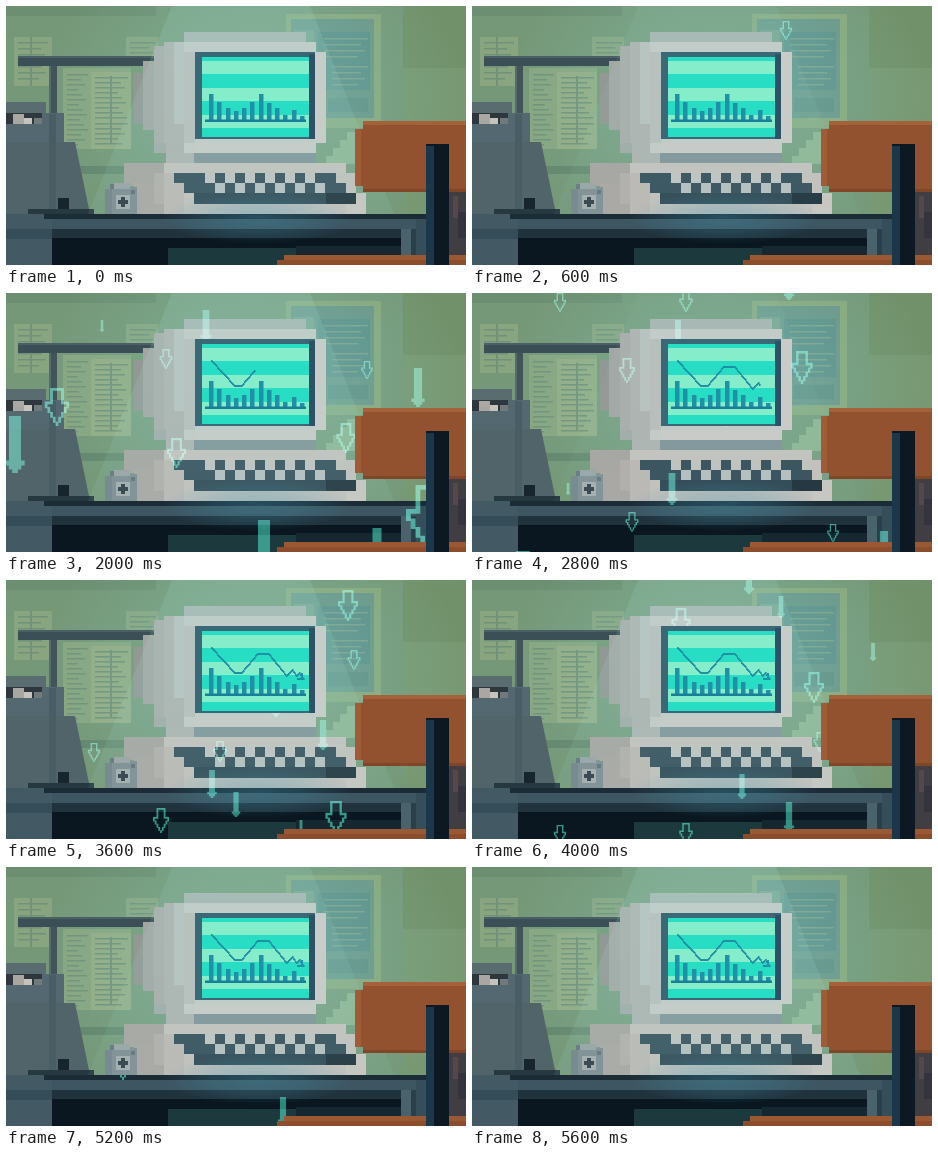
Animation of 460x259 px, one loop 6 s. Source, as an HTML page with a canvas:

```html
<!DOCTYPE html>
<html lang="en">
<head>
<meta charset="utf-8">
<title>Falling chart</title>
<style>
html, body { margin: 0; width: 100%; height: 100%; overflow: hidden; background: #759679; }
canvas { display: block; width: 460px; height: 259px; }
</style>
</head>
<body>
<canvas id="stage" width="460" height="259"></canvas>
<script>
const W = 460, H = 259, LOOP = 6000, STEP = 200, LAST = 28, SPEED = 40.8;
const ctx = document.getElementById('stage').getContext('2d');

// Fill a box given by its edges
function box(color, x1, y1, x2, y2) {
  ctx.fillStyle = color;
  ctx.fillRect(x1, y1, x2 - x1, y2 - y1);
}

function poly(color, ...p) {
  ctx.fillStyle = color;
  ctx.beginPath();
  for (let i = 0; i < p.length; i += 2) ctx.lineTo(p[i], p[i + 1]);
  ctx.fill();
}

function glow(x, y, rx, ry, rgb, alpha) {
  ctx.save();
  ctx.translate(x, y);
  ctx.scale(rx, ry);
  const g = ctx.createRadialGradient(0, 0, 0, 0, 0, 1);
  g.addColorStop(0, `rgba(${rgb},${alpha})`);
  g.addColorStop(0.5, `rgba(${rgb},${alpha * 0.6})`);
  g.addColorStop(1, `rgba(${rgb},0)`);
  ctx.fillStyle = g;
  ctx.fillRect(-1, -1, 2, 2);
  ctx.restore();
}

function cone(power) {
  const g = ctx.createLinearGradient(0, 0, 0, 212);
  g.addColorStop(0, `rgba(165,225,215,${power})`);
  g.addColorStop(1, `rgba(165,225,215,${power * 0.55})`);
  poly(g, 166, 0, 304, 0, 388, 208, 82, 208);
}

function textLines(color, x1, x2, y1, y2, gap) {
  for (let y = y1, k = 0; y < y2; y += gap, k++) {
    box(color, x1, y, x2 - (k * 7) % 11, y + 1.5);
  }
}

function wall() {
  box('#759878', 0, 0, W, H);
  box('#71916a', 397, 0, W, 62);
  box('#789872', 397, 62, W, H);
  box('rgba(70,100,85,.18)', 0, 0, 150, 10);
  box('rgba(70,105,90,.35)', 68, 160, 122, 168);

  // Papers on the left
  const paper = '#88a580', ink = '#71917a';
  box(paper, 8, 31, 46, 80);
  textLines(ink, 12, 42, 36, 76, 6);
  box(ink, 24, 31, 26, 80);
  box(paper, 120, 31, 152, 50);
  textLines(ink, 124, 150, 36, 48, 5);
  box(paper, 57, 62, 125, 143);
  box('#94ac84', 85, 66, 125, 143);
  textLines(ink, 61, 82, 68, 140, 5);
  textLines(ink, 89, 122, 71, 112, 5);
  textLines(ink, 89, 122, 117, 140, 5);
  box(ink, 104, 70, 106, 138);

  // Board on the right
  box('#89a77b', 280, 8, 375, 122);
  box('#699588', 285, 13, 368, 112);
  box('#5b8e88', 312, 26, 364, 84);
  box('#78a08c', 288, 24, 308, 44);
  textLines('#7ba08a', 318, 362, 32, 52, 6);
  textLines('#7ba08a', 326, 362, 60, 80, 6);
  box('#5f8d84', 322, 92, 362, 106);
  for (let k = 0; k < 4; k++) box('#90b28d', 320 + k * 7, 150 - k * 8, 349, 158 - k * 8);
}

function furniture() {
  box('#3b5056', 12, 50, 148, 60);
  box('#4a6064', 12, 50, 148, 52);
  box('#40545a', 43, 60, 51, 205);
  box('#566b6e', 43, 60, 45, 205);

  // Printer
  box('#596d70', 0, 96, 40, 108);
  box('#536870', 0, 107, 58, 137);
  poly('#506469', 0, 136, 69, 136, 84, 208, 0, 208);
  box('#485d64', 43, 108, 50, 205);
  box('#2e373d', 0, 107, 36, 118);
  box('#aaa7a2', 7, 108, 18, 118);
  box('#c6c2bc', 18, 112, 26, 118);
  box('#71797a', 28, 112, 36, 118);
  box('#17262e', 52, 192, 63, 204);

  // Desk
  box('#435a65', 0, 208, 46, H);
  box('#354d59', 0, 223, 46, 233);
  box('#263840', 22, 203, 88, 208);
  box('#1c2c36', 38, 208, 420, 213);
  box('#3d5662', 46, 213, 420, 223);
  box('#20333d', 46, 223, 410, 233);
  box('#0a1720', 46, 232, 395, H);
  box('#1c3a3d', 162, 242, 290, H);
  box('#152731', 290, 240, 395, 249);
  box('#4a626c', 395, 223, 405, 250);
  box('#29404b', 405, 223, 410, 250);
  box('#354e59', 410, 213, 420, 250);
}

function monitor() {
  // Casing
  box('#929894', 128, 67, 138, 118);
  box('#a2a7a4', 137, 55, 150, 124);
  box('#a9adaa', 148, 40, 160, 137);
  box('#aeb3b0', 158, 36, 180, 147);
  box('#a1aca9', 148, 137, 160, 147);
  box('#a8b7b3', 178, 26, 300, 36);
  box('#b9c2bf', 168, 36, 180, 118);
  box('#c4cac7', 178, 36, 310, 147);
  box('#b9beba', 178, 46, 189, 137);
  box('#cbcac7', 308, 46, 320, 137);
  box('#c9cac6', 188, 137, 310, 147);
  box('#adb4b1', 160, 147, 188, 157);
  box('#82969a', 188, 147, 310, 157);

  // Keyboard
  box('#a7a5a1', 118, 157, 160, 180);
  box('#aaa6a2', 128, 177, 180, 208);
  box('#b3aeaa', 148, 167, 170, 198);
  box('#c4c2be', 158, 157, 340, 167);
  box('#bcb8b4', 158, 167, 178, 208);
  box('#c3c0bc', 178, 167, 350, 208);
  box('#c9c5c0', 340, 187, 360, 208);
  box('#38525e', 168, 167, 330, 177);
  box('#38525e', 178, 177, 340, 187);
  box('#304955', 188, 187, 350, 198);
  box('#22343e', 320, 187, 350, 198);
  box('#c3c1bd', 330, 167, 340, 177);
  for (let k = 0; k < 6; k++) {
    box('#c0c3c0', 199 + k * 20, 167, 209 + k * 20, 177);
    box('#b6bfbe', 209 + k * 20, 177, 219 + k * 20, 187);
  }
}

const barTops = [88, 96, 102, 105, 102, 96, 88, 97, 102, 109, 104, 110];
const curve = [[205, 67], [228, 92], [235, 92], [251, 73], [262, 73], [280, 95],
  [286, 89], [290, 95], [293, 92], [297, 98]];
const reach = [[4, 205], [6, 220], [10, 249], [14, 288], [16, 298]];

function lerpAt(points, x) {
  if (x <= points[0][0]) return points[0][1];
  for (let k = 1; k < points.length; k++) {
    const [a, ya] = points[k - 1], [b, yb] = points[k];
    if (x <= b) return ya + (yb - ya) * (x - a) / (b - a);
  }
  return points[points.length - 1][1];
}

function screen(i) {
  box('#3b6877', 189, 46, 309, 133);
  box('#2c5265', 303, 48, 309, 133);
  box('#27dec5', 196, 51, 303, 131);
  for (let y = 55; y < 131; y += 27) box('#86edca', 196, y, 303, y + 13);
  const ink = '#2090a6';
  barTops.forEach((top, k) => {
    const x = Math.round(203 + k * 8.27);
    box(ink, x, top, x + 4.5, 114);
  });
  box('#197e98', 199, 113.5, 300, 116);

  if (i <= 4) return;
  const end = lerpAt(reach, i);
  for (let x = 205; x < end; x++) {
    const y = Math.round(lerpAt(curve, x));
    box(ink, x, y, x + 1.6, y + 2);
  }
  if (end >= 297) {
    box(ink, 291, 98, 297, 100);
    box(ink, 295, 93, 297, 100);
  }
}

// Each arrow: x, delay in pixels of fall, height
const hollow = [
  [421.5, 216, 67], [170.5, 263, 30], [314, 107, 19], [160, 352, 20],
  [361, 340, 18], [51, 313, 38], [340, 278, 30], [88, 571, 19],
  [214, 573, 21], [155, 506, 25], [330, 513, 33], [254, 455, 18],
  [342, 724, 31], [348, 664, 20], [117, 876, 28], [209, 788, 30]
];
const solid = [
  [371, 173, 43], [9, 285, 57], [96, 381, 12], [412, 333, 39], [258, 181, 57],
  [317, 594, 30], [206, 544, 28], [200, 391, 32], [230, 522, 25], [295, 494, 14],
  [270, 622, 25], [429, 918, 54], [309, 800, 22], [401, 753, 18], [277, 831, 29]
];

function hollowArrow(x, y, h) {
  const u = h / 14;
  // Both mirrored halves, in grid cells
  const cell = (cx, cy, w, d) => {
    ctx.rect(x + (cx - 4.5) * u, y + cy * u, w * u, d * u);
    ctx.rect(x + (4.5 - cx - w) * u, y + cy * u, w * u, d * u);
  };
  cell(2, 0, 2.5, 1);
  cell(2, 0, 1, 6);
  cell(0, 5, 3, 1);
  cell(0, 5, 1, 2.5);
  for (let k = 1; k < 4; k++) cell(k, 5.2 + k * 1.8, 1, 2.2);
  cell(4, 12.4, 0.5, 1.6);
}

function solidArrow(x, y, h) {
  const part = (w, a, b) => ctx.rect(x - w * h / 2, y + a * h, w * h, (b - a) * h);
  part(0.21, 0, 0.8);
  part(0.34, 0.78, 0.87);
  part(0.22, 0.86, 0.94);
  part(0.1, 0.93, 1);
}

function fall(list, shape, color, i) {
  ctx.fillStyle = color;
  for (const [x, delay, h] of list) {
    const y = Math.round(i * SPEED - delay);
    if (y > H || y + h < 0) continue;
    ctx.beginPath();
    shape(x, y, h);
    ctx.fill();
  }
}

function rain(i) {
  ctx.save();
  ctx.beginPath();
  ctx.rect(0, 0, W, H);
  ctx.rect(189, 46, 120, 87);
  ctx.clip('evenodd');
  ctx.globalCompositeOperation = 'screen';
  fall(solid, solidArrow, 'rgb(36,124,104)', i);
  fall(hollow, hollowArrow, 'rgb(42,142,118)', i);
  ctx.restore();
}

function camera() {
  box('#788b90', 99, 183, 108, 208);
  box('#839499', 106, 181, 131, 208);
  box('#9aa8aa', 108, 177, 124, 183);
  box('#6a7e85', 104, 178, 108, 183);
  box('#a5b0b0', 110, 189, 124, 203);
  box('#3a4b54', 112, 194, 122, 198);
  box('#3a4b54', 115, 191, 119, 201);
  box('#687b82', 125, 184, 129, 188);
}

function chair() {
  box('#403d43', 443, 186, W, H);
  box('#53484b', 447, 190, 452, 212);
  box('#34353c', 452, 206, W, 232);
  box('#93522f', 349, 123, W, 180);
  box('#93522f', 357, 115, W, 186);
  box('#a5613a', 357, 115, W, 119);
  box('#9f5c36', 349, 123, 355, 180);
  box('#814628', 357, 183, W, 186);
  box('#9b5933', 278, 249, W, H);
  box('#8b4d2c', 271, 254, W, H);
  box('#0c1822', 420, 138, 443, H);
  box('#1b374a', 420, 140, 428, H);
}

function draw(ms) {
  const i = Math.min(LAST, Math.floor(ms / STEP));
  const pulse = 0.5 + 0.5 * Math.cos(i / LAST * Math.PI * 6);
  wall();
  glow(248, 90, 210, 170, '140,205,190', 0.36);
  furniture();
  monitor();
  cone(0.05 + 0.12 * pulse);
  glow(252, 212, 95, 26, '65,150,175', 0.32);
  screen(i);
  rain(i);
  camera();
  chair();
}

const start = performance.now();
function tick() {
  draw((performance.now() - start) % LOOP);
  requestAnimationFrame(tick);
}
tick();
</script>
</body>
</html>
```
